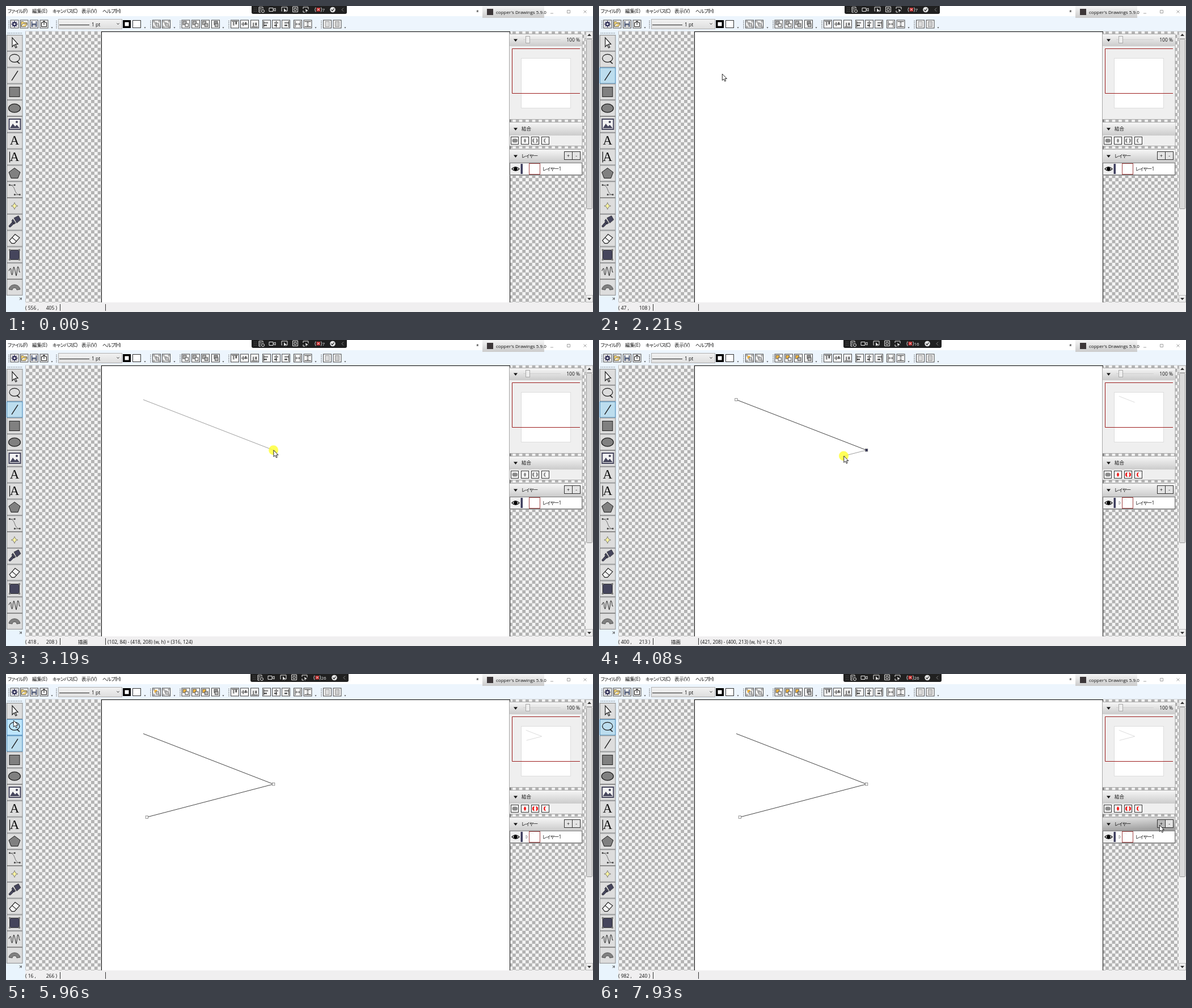
An HTML page for the animation above (8 s loop, 1035x541 px).

```html
<!DOCTYPE html>
<html lang="ja">
<head>
<meta charset="utf-8">
<title>Drawing editor</title>
<style>
html,body{margin:0;width:100%;height:100%;overflow:hidden;background:#fff}
svg{display:block;width:1035px;height:541px}
text{font:8.5px "Open Sans","Noto Sans CJK JP","Noto Sans CJK",sans-serif;fill:#111;font-feature-settings:"palt";white-space:pre}
.kana{letter-spacing:-.65px}
.warm{fill:#b4b4b4}
.bool{fill:#8a8a8a}
.drawn .warm{fill:#f5b942}
.drawn .bool{fill:#f01818}
</style>
</head>
<body>
<svg id="app" viewBox="0 0 1035 541" xmlns="http://www.w3.org/2000/svg"></svg>
<script>
const app = document.getElementById('app');
const R = (x, y, w, h, fill, more = '') => `<rect x="${x}" y="${y}" width="${w}" height="${h}" fill="${fill}" ${more}/>`;
const P = (d, fill = 'none', stroke = '#222', w = 1, more = '') => `<path d="${d}" fill="${fill}" stroke="${stroke}" stroke-width="${w}" ${more}/>`;
const C = (x, y, r, fill, more = '') => `<circle cx="${x}" cy="${y}" r="${r}" fill="${fill}" ${more}/>`;
const T = (x, y, s, more = '') => `<text x="${x}" y="${y}" ${more}>${s}</text>`;
const G = (x, y, s, more = '') => `<g transform="translate(${x} ${y})" ${more}>${s}</g>`;
const grad = (id, a, b, dx = 0) => `<linearGradient id="${id}" x2="${dx}" y2="1"><stop stop-color="${a}"/><stop offset="1" stop-color="${b}"/></linearGradient>`;
const edge = c => `stroke="${c}" stroke-width="1"`;

// Page units to screen pixels and back
const ZOOM = .72, LEFT = 168.5, TOP = 45;
const place = (x, y) => [LEFT + x * ZOOM, TOP + y * ZOOM];
const unit = ([x, y]) => [Math.round((x - LEFT) / ZOOM), Math.round((y - TOP) / ZOOM)];

function defs() {
  const q = 8 * ZOOM;
  return `<defs>${grad('bar', '#f6f6f6', '#cbcbcb')}${grad('barHot', '#e6e6e6', '#a0a0a0', .3)}${grad('combo', '#f2f2f2', '#dedede')}
    <pattern id="check" x="40.6" y="45" width="${2 * q}" height="${2 * q}" patternUnits="userSpaceOnUse">
    ${R(0, 0, 2 * q, 2 * q, '#f4f4f4') + R(0, 0, q, q, '#b2b2b2') + R(q, q, q, q, '#b2b2b2')}</pattern></defs>`;
}

function stage() {
  return R(0, 0, 1035, 541, '#fff') + R(0, 18, 1035, 27, '#edf5fd') + R(0, 45, 34, 496, '#e9f4fd')
    + R(34, 45, 988, 479, 'url(#check)') + R(168.5, 45.5, 720, 490, '#fff', edge('#111'))
    + R(34, 524, 1001, 17, '#f0eff0') + R(34, 44, 1001, 1, '#d5dbe0')
    + P('M95.5 527V539M175.5 527V539', 'none', '#333')
    + R(1022, 45, 13, 479, '#f0f0f0') + R(1022.5, 45.5, 12, 12, '#eee', edge('#bbb')) + R(1022.5, 511.5, 12, 12, '#eee', edge('#bbb'))
    + R(1023.5, 58.5, 10, 300, '#dadada', edge('#999') + ' rx="1"')
    + P('M1025 53L1028.5 49 1032 53ZM1025 516L1028.5 520 1032 516Z', '#333', 'none');
}

function titleBar() {
  const kana = 'class="kana"';
  const menus = [[3, 'ファイル(F)', kana], [46, '編集(E)'], [82, 'キャンバス(C)', kana], [133, '表示(V)'], [170, 'ヘルプ(H)', kana]];
  return menus.map(([x, s, more]) => T(x, 12, s, more)).join('') + T(829, 14, '*')
    + R(840, 0, 109, 21, 'url(#bar)') + R(848, 5, 11, 11, '#3c3638')
    + T(864, 14, "copper's Drawings 5.9.0", 'style="font-size:8px"')
    + P('M960 13h5M989.5 7.5h5v5h-5zM1018.5 7.5l5 5m0-5l-5 5', 'none', '#999', .9);
}

// Small command buttons in a 15px box
function commands() {
  const frame = R(.5, .5, 14, 14, '#f7f7f7', edge('#444'));
  const gear = C(7.5, 7.5, 3.3, 'none', 'stroke="#35355a" stroke-width="2"') + P('M7.5 1.5v12M1.5 7.5h12M3.3 3.3l8.4 8.4M11.7 3.3l-8.4 8.4', 'none', '#35355a', 1.2) + C(7.5, 7.5, 1.5, '#fff');
  const folder = P('M2 12V3h4l1 1.5h5V7H5L2 12H10l3-5h-2', '#f0d070', '#555', .8);
  const disk = R(2.5, 2.5, 10, 10, '#55607c') + R(4.5, 2.5, 6, 4, '#eee') + R(5, 9, 5, 3.5, '#ccc');
  const out = P('M5 5H3v7h9V5h-2M7.5 9V2M5 4.5L7.5 2 10 4.5', 'none', '#222', 1.1);
  const group = n => R(3.5, 3.5, 5, 5, '#bbb', n ? '' : 'class="warm"') + R(6.5, 6.5, 5, 5, '#ccc', edge('#777'))
    + P('M2 2h2v2H2zM11 2h2v2h-2zM2 11h2v2H2zM11 11h2v2h-2z', '#fff', '#555', .6);
  const order = n => R(n === 3 ? 5 : 2.5, 2.5, 6, 6, '#999', (n < 3 ? 'class="warm" ' : '') + edge('#555'))
    + R(6.5, 6.5, 5.5, 5.5, n > 1 ? '#bbb' : '#eee', edge('#555'));
  const align = n => {
    const at = [2.5, 7.5, 12.5][n % 3], a = [3, 4, 5][n % 3];
    const s = P(`M2 ${at}h11`) + R(4, a, 2.5, 7, '#888') + R(8.5, a, 2.5, 5, '#555');
    return n < 3 ? s : `<g transform="matrix(0 1 1 0 0 0)">${s}</g>`;
  };
  const spread = n => {
    const s = P('M3 2v11M12 2v11', 'none', '#333') + P('M4 7.5h7M6 5.5l-2 2 2 2M9 5.5l2 2-2 2', 'none', '#555', .9);
    return n ? `<g transform="matrix(0 1 1 0 0 0)">${s}</g>` : s;
  };
  const page = n => R(4, 3, 7, 9, n ? '#ccc' : '#ddd', edge('#999'));
  const sets = [
    [[7.5, 24.5, 42, 59.5], n => [gear, folder, disk, out][n]],
    [[258, 275], group],
    [[309.5, 327, 344, 362], order],
    [[396, 413, 431, 452, 469, 486], align],
    [[507, 524.5], spread],
    [[559, 576.5], page]
  ];
  const list = sets.map(([xs, icon]) => xs.map((x, n) => G(x, 24.5, frame + icon(n))).join('')).join('');
  const grips = [5, 89, 255, 307, 393, 556].map(x => P(`M${x} 26V40`, 'none', '#444', 1.2, 'stroke-dasharray="1.2 1.8"')).join('');
  const more = [81, 245, 297, 383, 546, 598].map(x => P(`M${x - 1.5} 37.5h3l-1.5 2z`, '#333', 'none')).join('');
  return list + grips + more
    + R(92.5, 23.5, 112, 17, 'url(#combo)', edge('#b0b0b0')) + P('M94 33.5H147M195.5 30.5l2 2 2-2')
    + T(151, 36, '1 pt')
    + R(206, 25, 14, 14, '#000') + R(209.5, 28.5, 7, 7, '#fff') + R(223.5, 25.5, 14, 13, '#fff', edge('#333'));
}

const toolY = n => 51 + n * 28.8;
function tools() {
  const ink = '#1c1c1c';
  const serif = s => T(14, 21, s, 'text-anchor="middle" style="font:23px \'Liberation Serif\',serif"');
  const ellipse = (y, rx, ry, fill) => `<ellipse cx="14" cy="${y}" rx="${rx}" ry="${ry}" fill="${fill}" stroke="${ink}" stroke-width="1.2"/>`;
  const icons = [
    P('M10 5V21L13.5 17.5 16 23 18 22 15.5 16.5H20Z', '#fff', ink, 1.2),
    ellipse(12.5, 9, 7, 'none') + P('M18 18l5 4', 'none', ink, 1.6),
    P('M9 23L20 6', 'none', ink, 1.4),
    R(5, 6, 18, 17, '#808080', edge(ink)),
    ellipse(14.5, 10.5, 7.5, '#808080'),
    R(4.5, 5, 20, 18, '#f2f2f2', 'stroke="#45455c" stroke-width="2"') + P('M6 21l5-8 4 5 3-3 5 6z', '#45455c', 'none') + C(18, 10, 2, '#45455c'),
    serif('A'),
    serif('A') + P('M5.5 5V24', 'none', ink, 1.3),
    P('M14 5L24 12.5 20 23H8L4 12.5Z', '#808080', ink),
    P('M6 6.5H14M14 23.5H23M6 6.5C17 7 12 23 23 23.5', 'none', '#555', .8) + [[4, 5], [13, 5], [13, 22], [22, 22]].map(([x, y]) => R(x, y, 2.6, 2.6, '#444')).join(''),
    P('M14 8.5L16 13 20 14.5 16 16 14 20.5 12 16 8 14.5 12 13Z', '#fff7a0', '#777', .9),
    P('M13 7L21 3 25 10 18 16ZM11 9l5 7-3 2-4-6zM10 14l3 3-6 6q-3 1-3-2z', '#45455c', ink, .6),
    P('M5 18L15 7l8 6L14 23H9ZM10 13l7 6', '#f4f4f4', ink, 1.1),
    R(5.5, 6, 17, 17, '#45455c', edge('#333')) + [4, 21].map(x => [4.5, 21.5].map(y => R(x, y, 3, 3, '#777')).join('')).join(''),
    P('M4 14c3-6 4-5 4 0s2 12 3 2 2-12 4-2 2 11 3 4 1-14 3-10 0 9 3 8', 'none', '#333', 1.1),
    P('M4 18C6 7 22 7 24 18L18 19C17 14 11 14 10 19Z', '#808080', '#444', .8)
  ];
  return P('M3 48H28', 'none', '#444', 1.2, 'stroke-dasharray="1.2 1.8"')
    + icons.map((s, n) => G(1, toolY(n), R(.5, .5, 27.5, 27.8, '#dddddd', edge('#8a8a8a') + ' class="tool"') + s)).join('')
    + P('M24 515.5l2 2-2 2M27 515.5v4');
}

function panels() {
  const head = (y, h, id) => R(888, y, 128, h, 'url(#bar)', `id="${id}"`) + P(`M895 ${y + h / 2 - 2}h7l-3.5 4.5z`, '#111', 'none');
  const box = (y, h) => R(887.5, y, 128.5, h, '#efefef', edge('#a8a8a8'));
  const shape = d => `<path d="${d}" class="bool"/>`;
  const bools = [
    C(6, 7, 3.5, '#8a8a8a') + C(8.5, 7, 3.5, '#8a8a8a'),
    shape('M7 3Q11 7 7 11 3 7 7 3Z'),
    shape('M6 3a4 4 0 0 0 0 8q-2.5-4 0-8zM8 3a4 4 0 0 1 0 8q2.5-4 0-8z'),
    shape('M8 3a4 4 0 1 0 0 8q-3.5-4 0-8z')
  ];
  return box(49.5, 151) + head(50, 21, 'zoomHead') + P('M912 59.5H978', 'none', '#d0d0d0') + R(916.5, 53.5, 7, 12, '#eee', edge('#aaa'))
    + T(1012, 63, '100 %', 'text-anchor="end"')
    + R(908.5, 92.5, 87, 88, '#fff', edge('#ddd')) + P('M1012 75.5H892.5V154.5H1012', 'none', '#9b1c1c')
    + box(205.5, 42) + head(206, 23, 'joinHead') + T(909, 220, '結合')
    + bools.map((s, n) => G(890 + n * 18, 231, R(.5, .5, 13, 13, '#f8f8f8', edge('#333')) + s)).join('')
    + box(253.5, 46) + head(254, 23, 'layerHead') + T(909, 268, 'レイヤー', 'class="kana"')
    + R(984.5, 257.5, 14, 14, '#e4e4e4', edge('#333') + ' id="plus"') + R(998.5, 257.5, 14, 14, '#e4e4e4', edge('#333'))
    + T(991.5, 268, '+', 'text-anchor="middle"') + T(1005.5, 268, '-', 'text-anchor="middle"')
    + R(888.5, 277.5, 127, 21, '#fff', edge('#777')) + R(889, 278, 18, 20, '#eee') + R(907.5, 279, 3.5, 18, '#3c3c5c')
    + P('M892 288Q898.5 281 905 288 898.5 295 892 288Z', '#fff', '#111', 1.2) + C(898.5, 288, 3.3, '#000')
    + R(922.5, 278.5, 19, 19, '#fff', edge('#a04040')) + T(946, 291, 'レイヤー1', 'class="kana"');
}

// Dark strip at the top, widened when the counter gets a second digit
function strip(count) {
  const wide = count > 9 ? 1 : 0, x = 433 - 2 * wide, w = 168 + 5 * wide, k = '#e8e8e8';
  const line = (d, lw = 1) => P(d, 'none', k, lw);
  return P(`M${x} 0h${w}v11q0 3-3 3h${-(w - 6)}q-3 0-3-3z`, '#202020', 'none')
    + P(`M${x + 5} 3v9M${x + 8} 3v9`, 'none', '#777', 1, 'stroke-dasharray="1 2"')
    + G(x, 0, line('M13 2h7v3M13 2v9h3M14 5h4M14 8h2') + C(20, 9, 2.5, 'none', edge(k))
      + line('M31 3.5h7v6h-7zM38 6l4-2v5l-4-2')
      + line('M54 9h-1V2h10v7h-2') + P('M57 4l5 5-2 0 1 3-2-3-2 2z', k, 'none')
      + line('M72.5 1.5h9v9h-9zM75 4h4v4h-4z')
      + line('M91 5V2h9v4M91 8v3h3') + P('M95 5l5 4h-3l-1 3z', k, 'none')
      + line('M113 2.5q-2.5 4 0 8M122.5 2.5q2.5 4 0 8', .9) + R(114.5, 3, 6.5, 6.5, '#c83232') + line('M116 4.5l3.5 3.5m0-3.5l-3.5 3.5', .9))
    + T(x + 124.5, 9.8, count, 'style="fill:#eee;font-size:8px"')
    + G(x + 143 + 5 * wide, 6.5, C(0, 0, 4.8, '#e4e4e4') + P('M-2.5 0l2 2 3-4', 'none', '#222', 1.2))
    + P(`M${x + w - 6} 3.5l-3 3 3 3`, 'none', '#888');
}

app.innerHTML = defs() + stage() + titleBar() + commands() + tools() + panels() + '<g id="live"></g>';
const part = id => document.getElementById(id);
const live = part('live'), joinHead = part('joinHead'), layerHead = part('layerHead'), plus = part('plus');
const buttons = [...app.querySelectorAll('.tool')];

// Screen updates come in bursts: start, end, number of steps
const bursts = [[460, 1240, 12], [1310, 2070, 11], [2140, 2910, 12], [2980, 3460, 7], [3730, 4510, 12], [4580, 4650, 2],
  [4850, 5060, 4], [5260, 6030, 12], [6160, 6770, 8], [6970, 7730, 11], [7810, 7930, 3]];
function snap(t) {
  const b = bursts.filter(v => v[0] <= t).pop();
  if (!b) return 0;
  const step = (b[1] - b[0]) / (b[2] - 1);
  return b[0] + Math.floor((Math.min(t, b[1]) - b[0]) / step + .001) * step;
}

const A = place(102, 84), B = place(421, 208), D = place(111, 289);

// Pointer path: time, x, y
const path = [
  [460, 893, 440], [700, 560, 300], [980, 180, 190], [1240, 31, 142], [1310, 20, 130], [1500, 14, 124], [1800, 14, 124],
  [1900, 40, 126], [2070, 187, 128], [2140, ...place(47, 108)], [2210, 217, 120], [2350, 238, 107], [2430, ...A], [2520, ...A],
  [2910, 433, 180], [2980, 452, 187], [3070, ...place(418, 208)], [3140, ...B], [3900, ...B], [4510, 256, 250],
  [4650, ...D], [5260, ...D], [5400, ...place(16, 266)], [5750, 40, 140], [5960, 13, 82], [6160, 13, 83],
  [6500, 14, 88], [6770, 32, 113], [6970, 60, 116], [7125, ...place(982, 240)], [7198, 925, 228], [7280, 925, 228],
  [7730, 972, 265], [7930, 988, 267]
];
function pointer(t) {
  const n = path.findIndex(k => k[0] > t);
  if (n < 0) return path[path.length - 1].slice(1);
  if (!n) return path[0].slice(1);
  const [a, b] = [path[n - 1], path[n]], f = (t - a[0]) / (b[0] - a[0]);
  return [a[1] + (b[1] - a[1]) * f, a[2] + (b[2] - a[2]) * f];
}

// Last pointer place over the page, in page units
function pagePoint(t) {
  for (let s = t - 70; s >= 460; s--) {
    const p = pointer(s);
    if (p[0] >= 179.8 && p[0] <= 875.8) return unit(p);
  }
  return [556, 405];
}

const seg = (a, b, c, w) => P(`M${a}L${b}`, 'none', c, w);
const grip = ([x, y], fill = '#fff') => R(x - 2.2, y - 2.2, 4.4, 4.4, fill, 'stroke="#777" stroke-width=".8"');
const mini = ([x, y]) => [908 + (x - LEFT) * .121, 92 + (y - TOP) * .122];
const within = (t, a, b) => t >= a && t < b;

function scene(t) {
  const [x, y] = pointer(t), [px, py] = pagePoint(t);
  const one = t >= 3290, two = t >= 5050;
  const start = within(t, 2500, 3290) ? [102, 84] : within(t, 3850, 5050) ? [421, 208] : null;
  const down = [[1560, 1690], [2430, 3210], [3770, 4800], [6200, 6300]].some(([a, b]) => within(t, a, b));
  let s = strip(t < 4000 ? 7 : t < 5500 ? 16 : 26);

  if (one) {
    s += seg(A, B, '#111', .8) + seg(mini(A), mini(B), '#d4d4d4', .8)
      + P('M917 285l3 3-3 3z', '#fff', '#888', .8) + P('M925 281l6 2', 'none', '#eee', .8);
    if (!two) s += grip(A) + grip(B, t > 3730 ? '#20204c' : '#fff');
  }
  if (two) s += seg(B, D, '#111', .8) + seg(mini(B), mini(D), '#d4d4d4', .8) + grip(B) + grip(D);
  if (start) {
    s += seg(place(...start), [x, y], '#858585', .8)
      + T(127, 536.5, '描画')
      + T(179, 536.5, `(${start[0]}, ${start[1]}) - (${px}, ${py}) (w, h) = (${px - start[0]}, ${py - start[1]})`);
  }
  s += T(34, 536.5, `( ${px} ,`) + T(90, 536.5, `${py} )`, 'text-anchor="end"');
  if (down) s += C(x, y, 8.5, '#ffff30', 'opacity=".8"');
  if (t >= 460) s += G(x, y, P('M.3 0V11.5L3 9.2 4.8 13.2 6.6 12.4 4.9 8.5H8.4Z', '#fff', '#111', .9));
  live.innerHTML = s;

  app.classList.toggle('drawn', one);
  const hot = t >= 460 && x < 30 ? Math.floor((y - 51) / 28.8) : -1;
  const chosen = t < 1620 ? -1 : t < 6230 ? 2 : 1;
  buttons.forEach((b, n) => {
    b.setAttribute('fill', n === hot ? '#bee6fd' : n === chosen ? '#bcddee' : '#dddddd');
    b.setAttribute('stroke', n === hot || n === chosen ? '#3c7fb1' : '#8a8a8a');
  });
  const over = (a, b) => x >= 888 && x <= 1016 && y >= a && y < b && t > 6970;
  joinHead.setAttribute('fill', over(206, 229) ? 'url(#barHot)' : 'url(#bar)');
  layerHead.setAttribute('fill', over(254, 277) ? 'url(#barHot)' : 'url(#bar)');
  plus.setAttribute('fill', over(257, 272) && x >= 984 && x < 999 ? '#b8b8b8' : '#e4e4e4');
}

const LOOP = 8000;
let begin = null, shown = -1;
function tick(now) {
  if (begin === null) begin = now;
  const t = snap((now - begin) % LOOP);
  if (t !== shown) scene(shown = t);
  requestAnimationFrame(tick);
}
scene(0);
requestAnimationFrame(tick);
</script>
</body>
</html>
```
